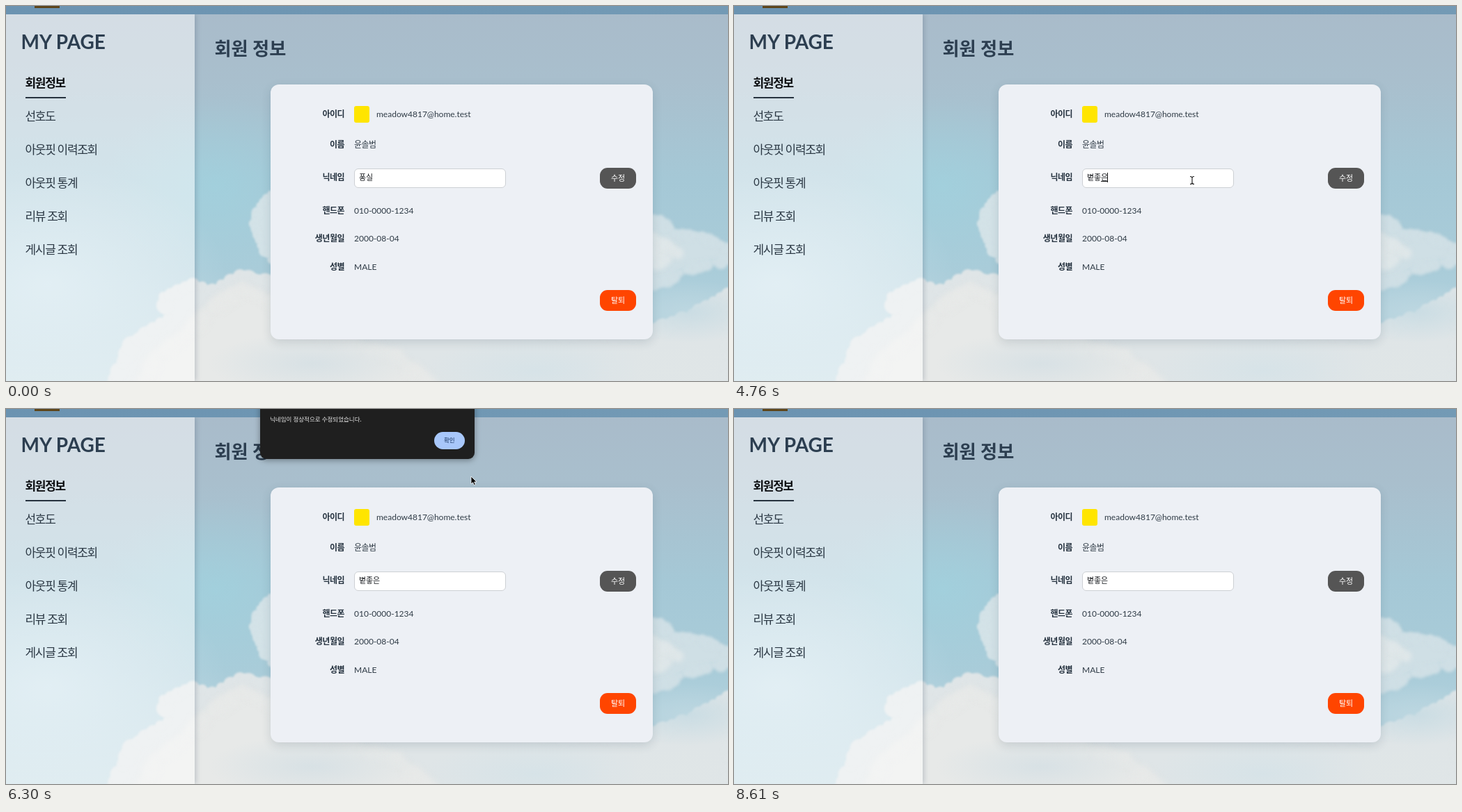
An HTML page with a canvas that plays this animation: 1037 by 540 pixels, repeating every 8680 ms.

```html
<!DOCTYPE html>
<html lang="ko">
<head>
<meta charset="utf-8">
<title>MY PAGE</title>
<style>
html, body { margin: 0; width: 100%; height: 100%; overflow: hidden; }
#stage {
  position: relative; width: 1037px; height: 540px; overflow: hidden;
  font-family: Lato, "Noto Sans CJK KR", "Noto Sans CJK", sans-serif; color: #2c3a47;
}
#stage > *, #dialog > * { position: absolute; box-sizing: border-box; }
.text { height: 40px; line-height: 40px; white-space: pre; }
#side {
  left: 0; top: 12px; width: 271px; height: 528px;
  background: rgba(255,255,255,.5); box-shadow: 2px 0 7px rgba(40,60,80,.22);
}
#bar { left: 0; top: 0; width: 1037px; height: 12px; background: linear-gradient(90deg, #6b93b1, #739ab5); }
#logo { left: 41px; top: -33px; width: 36px; height: 36px; background: #5d4519; }
.title { font-weight: 700; color: #2c3e50; }
.menu { font-size: 17px; letter-spacing: -1.3px; color: #2b3844; }
.menu.on { font-weight: 700; color: #0b0d10; }
#line { left: 28px; top: 131px; width: 58px; height: 2px; background: #26323e; }
#card {
  left: 380px; top: 113px; width: 549px; height: 367px; border-radius: 12px;
  background: #edf0f5; box-shadow: 0 4px 14px rgba(40,60,80,.16);
}
.label { font-size: 12px; letter-spacing: -.5px; font-weight: 700; color: #24313e; }
.value { font-size: 12px; color: #2f3b46; }
.hangul { letter-spacing: -.5px; }
#badge { left: 500px; top: 144px; width: 22px; height: 24px; border-radius: 3px; background: #ffe500; }
#input {
  left: 500px; top: 234px; width: 218px; height: 28px; border-radius: 6px;
  background: #fff; border: 1px solid #cdd0d4;
}
#nick { left: 507px; top: 227px; font-size: 11px; letter-spacing: -.12px; font-weight: 500; color: #15181c; }
#under { top: 252px; width: 10px; height: 1px; background: #222; }
#caret { top: 240px; width: 1px; height: 14px; background: #111; }
.button {
  left: 853px; width: 52px; height: 30px; border-radius: 11px;
  font-size: 11px; line-height: 29px; text-align: center; color: #fff;
}
#dialog {
  left: 364.5px; top: -40px; width: 308px; height: 111.5px; border-radius: 9px;
  background: #1f1f1f; box-shadow: 0 2px 8px rgba(0,0,0,.35); transform-origin: 50% 100%;
}
#dialog .text { left: 14px; top: 35px; font-size: 8.5px; color: #e8e8e8; }
#dialog .ok {
  left: 249.5px; top: 73px; width: 44.5px; height: 25px; border-radius: 13px;
  background: #a8c7fa; color: #16335f; font-size: 8.5px; line-height: 24px; text-align: center;
}
.pointer { left: 0; top: 0; overflow: visible; }
</style>
</head>
<body>
<div id="stage">
  <canvas id="sky" width="1037" height="540"></canvas>
  <div id="side"></div>
  <div id="bar"></div>
  <div id="logo"></div>
  <div id="line"></div>
  <div id="card"></div>
  <div id="badge"></div>
  <div id="input"></div>
  <div id="nick" class="text"></div>
  <div id="under"></div>
  <div id="caret"></div>
  <div class="button" style="top:233px;background:#555">수정</div>
  <div class="button" style="top:409px;background:#ff4500">탈퇴</div>
</div>
<script>
const LOOP = 8680, STEP = 70;
const stage = document.getElementById('stage');
const $ = id => document.getElementById(id);

function addText(text, x, y, cls, style = '') {
  const el = document.createElement('div');
  el.className = 'text ' + cls;
  el.textContent = text;
  el.style.cssText = `left:${x}px;top:${y - 20}px;${style}`;
  stage.append(el);
  return el;
}

addText('MY PAGE', 21.5, 50.5, 'title', 'font-size:28px');
addText('회원 정보', 299.5, 61, 'title', 'font-size:26.2px');
['회원정보', '선호도', '아웃핏 이력조회', '아웃핏 통계', '리뷰 조회', '게시글 조회']
  .forEach((name, i) => addText(name, 27.5, 111 + 48 * i, i ? 'menu' : 'menu on'));

[
  ['아이디', 156, 'meadow4817@home.test', 532],
  ['이름', 200, '윤솔범', 500, 'hangul'],
  ['닉네임', 247],
  ['핸드폰', 295, '010-0000-1234', 500],
  ['생년월일', 335, '2000-08-04', 500],
  ['성별', 376, 'MALE', 500],
].forEach(([label, y, value, x, cls = '']) => {
  addText(label, 0, y, 'label', 'width:486px;text-align:right');
  if (value) addText(value, x, y, 'value ' + cls);
});

stage.insertAdjacentHTML('beforeend', `
  <div id="dialog">
    <div class="text">닉네임이 정상적으로 수정되었습니다.</div>
    <div class="ok">확인</div>
  </div>
  <svg id="arrow" class="pointer" width="12" height="16">
    <path d="M0 0V11L2.6 8.7L4.3 12.6L6.3 11.7L4.6 8H8Z" fill="#000" stroke="#fff" stroke-width=".8"/>
  </svg>
  <svg id="beam" class="pointer" width="8" height="12">
    <g fill="none">
      <path id="ibar" d="M-3 -5.5Q0 -5.5 0 -3.5Q0 -5.5 3 -5.5M0 -4V4M-3 5.5Q0 5.5 0 3.5Q0 5.5 3 5.5" stroke="#fff" stroke-width="2.4"/>
      <use href="#ibar" style="stroke:#111"/>
      <path d="M-3 -5.5Q0 -5.5 0 -3.5Q0 -5.5 3 -5.5M0 -4V4M-3 5.5Q0 5.5 0 3.5Q0 5.5 3 5.5" stroke="#111" stroke-width="1.1"/>
    </g>
  </svg>`);

// Sky: a gradient with soft puffs along a few cloud outlines
function paintSky() {
  const c = $('sky').getContext('2d');
  let seed = 11;
  const rnd = () => (seed = seed * 16807 % 2147483647) / 2147483647;

  const fade = c.createLinearGradient(0, 0, 0, 540);
  [[0, '#a9bbca'], [.2, '#a9bfcd'], [.46, '#a5c8d6'], [.7, '#a9ccd9'], [1, '#bfd9e2']]
    .forEach(([p, color]) => fade.addColorStop(p, color));
  c.fillStyle = fade;
  c.fillRect(0, 0, 1037, 540);

  function glow(x, y, rx, ry, rgb, alpha) {
    c.save();
    c.translate(x, y);
    c.scale(rx, ry);
    const g = c.createRadialGradient(0, 0, 0, 0, 0, 1);
    g.addColorStop(0, `rgba(${rgb},${alpha})`);
    g.addColorStop(1, `rgba(${rgb},0)`);
    c.fillStyle = g;
    c.fillRect(-1, -1, 2, 2);
    c.restore();
  }

  function cloud(points, color, size, blur) {
    c.save();
    c.filter = `blur(${blur}px)`;
    c.fillStyle = color;
    c.beginPath();
    points.forEach(([x, y]) => c.lineTo(x, y));
    c.fill();
    points.slice(1).forEach(([x, y], i) => {
      const [px, py] = points[i];
      const n = Math.ceil(Math.hypot(x - px, y - py) / size);
      for (let k = 0; k < n; k++) {
        const f = k / n, r = size * (.4 + rnd() * .5);
        c.beginPath();
        c.arc(px + (x - px) * f, py + (y - py) * f + r * .5, r, 0, 7);
        c.fill();
      }
    });
    c.restore();
  }

  glow(300, 260, 160, 130, '160,212,224', .6);
  glow(60, 400, 260, 170, '205,228,238', .75);
  cloud([[380, 268], [364, 285], [356, 310], [366, 342], [382, 362], [450, 350]], '#d3e2e7', 11, 1.5);
  cloud([[900, 300], [940, 304], [962, 324], [1000, 328], [1037, 345], [1037, 362],
    [986, 372], [950, 390], [900, 400]], '#cfdfe5', 12, 2);
  cloud([[920, 325], [945, 338], [965, 352], [925, 375]], '#dfe7e9', 10, 3);
  cloud([[150, 545], [180, 482], [232, 445], [226, 415], [268, 396], [296, 404], [336, 384],
    [384, 394], [520, 430], [700, 455], [860, 475], [930, 462], [985, 440], [1037, 410], [1037, 545]],
    '#dfe5e7', 15, 1.5);
  cloud([[190, 550], [214, 500], [255, 470], [296, 428], [340, 402], [400, 430], [470, 478], [560, 498],
    [620, 550]], '#e7e9e8', 16, 4);
  glow(440, 515, 150, 45, '212,223,228', .8);
  glow(760, 525, 160, 50, '211,226,232', .7);
  glow(980, 440, 110, 45, '193,217,226', .7);
  glow(950, 525, 120, 45, '224,230,231', .8);
}
paintSky();

// time, nickname, whether its last syllable is still being composed
const typing = [
  [0, '퐁실'], [2100, '퐁'], [2170, ''], [2870, 'ㅂ', 1], [3570, '벼', 1], [3710, '볕', 1],
  [3920, '볕ㅈ', 1], [3990, '볕조', 1], [4200, '볕좋', 1], [4340, '볕좋ㅇ', 1],
  [4410, '볕좋으', 1], [4480, '볕좋은', 1], [5250, '볕좋은'],
];
const caretOn = [[1330, 1820], [2100, 2380], [2870, 3430], [3570, 5250]];
const pointerOn = [[70, 1400], [4760, 8610]];
const path = [
  [70, 1010, 415], [560, 603, 243], [700, 603, 243], [770, 626, 260], [840, 626, 260], [910, 603, 243],
  [1050, 603, 243], [1400, 658, 251], [4760, 658, 251], [5180, 871, 247], [5880, 871, 247],
  [6090, 675, 106], [6230, 675, 106], [6300, 668, 97], [6720, 637, 55], [7210, 637, 55],
  [7420, 679, 198], [7630, 679, 198], [7840, 757, 289], [8260, 757, 289], [8610, 528, 545],
];
const dialogFade = [[5390, 0], [5460, .12], [5600, .86], [5670, 1], [6790, 1], [7070, 0]];

const within = (spans, t) => spans.some(([a, b]) => t >= a && t < b);

function sample(keys, t) {
  const i = keys.findIndex(k => k[0] > t);
  if (i < 0) return keys[keys.length - 1].slice(1);
  if (i === 0) return keys[0].slice(1);
  const a = keys[i - 1], b = keys[i], f = (t - a[0]) / (b[0] - a[0]);
  const e = f * f * (3 - 2 * f);
  return a.slice(1).map((v, k) => v + (b[k + 1] - v) * e);
}

const show = (el, on) => { el.style.visibility = on ? 'visible' : 'hidden'; };

function draw(t) {
  const [, nick, composing] = typing.filter(k => k[0] <= t).pop();
  if ($('nick').textContent !== nick) $('nick').textContent = nick;
  const end = 507 + nick.length * 10;
  $('under').style.left = end - 10 + 'px';
  $('caret').style.left = end - (nick ? 1 : 0) + 'px';
  show($('under'), composing);
  show($('caret'), within(caretOn, t));

  const [x, y] = sample(path, t);
  const seen = within(pointerOn, t);
  const inField = x > 500 && x < 718 && y > 234 && y < 262;
  show($('arrow'), seen && !inField);
  show($('beam'), seen && inField);
  $('arrow').style.transform = $('beam').style.transform = `translate(${x}px,${y}px)`;

  const [o] = sample(dialogFade, t);
  show($('dialog'), o > 0);
  $('dialog').style.opacity = o;
  $('dialog').style.transform = `translateY(${(o - 1) * 21}px) scale(${1 - (1 - o) * .046})`;
}

const start = performance.now();
function tick() {
  const t = (performance.now() - start) % LOOP;
  draw(Math.floor(t / STEP) * STEP);
  requestAnimationFrame(tick);
}
draw(0);
tick();
</script>
</body>
</html>
```
